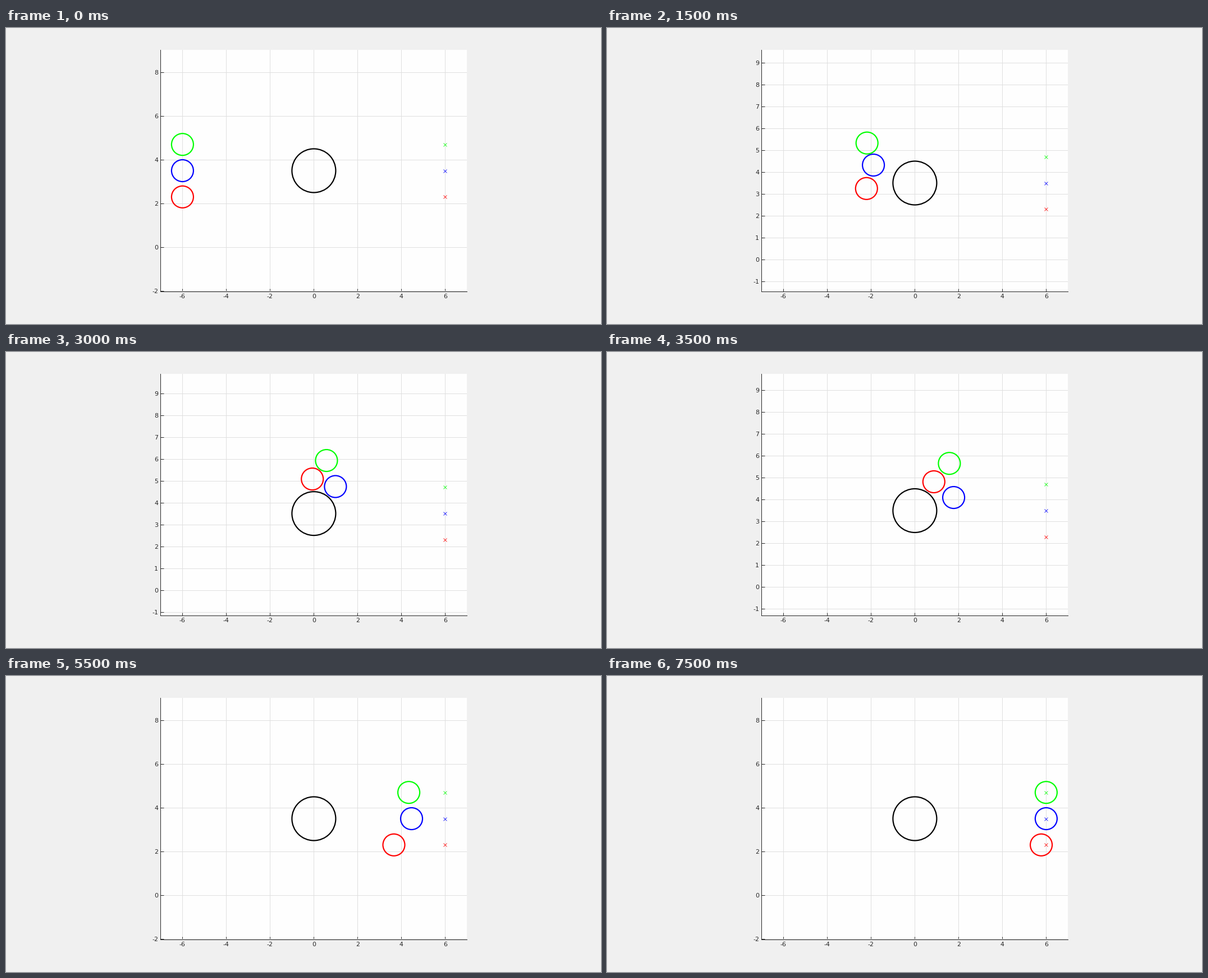
Recreate the animation shown at these times as a matplotlib script. Size 1060 px wide and 528 px high, loop 8 s.

```python
import math

import matplotlib.pyplot as plt
import numpy as np
from matplotlib.animation import FuncAnimation
from matplotlib.patches import Circle

W, H, DPI = 1060, 528, 100
LEFT, BOTTOM, WIDTH, HEIGHT = 275.4, 58.0, 546, 431
UNIT = WIDTH / 14                 # pixels per data unit, same on both axes
HALF = HEIGHT / UNIT / 2          # half of the visible y range
STEPS, STEP_MS = 16, 500
INK = "#262626"
RADIUS = 0.5
START, GOAL = -6, 6
POST = np.array([0, 3.5])         # centre of the black obstacle
CLEARANCE = 1.58                  # closest a disc centre gets to it

# Each disc leaves and reaches its lane; between, it swerves via key points.
KEY_STEPS = [0, 2, 4, 5, 7, 8, 9, 15]
DISCS = [  # colour, lane height, x at later keys, y at the swerve keys
    ("#ff0000", 2.3, [-3.1, -1.51, -0.96, 0.87, 1.48, 2.295, 5.774],
     [2.7, 4.0, 4.77, 4.82, 3.4]),
    ("#0000ff", 3.5, [-3.1, -0.81, 0.14, 1.774, 2.55, 3.264, 6.35],
     [3.8, 4.875, 5.1, 4.1, 3.6]),
    ("#00ff00", 4.7, [-3.1, -1.365, -0.45, 1.577, 2.4, 3.11, 6.35],
     [4.9, 5.816, 6.03, 5.66, 4.905]),
]


def end_slope(h0, h1, d0, d1):
    slope = ((2 * h0 + h1) * d0 - h0 * d1) / (h0 + h1)
    return slope if slope * d0 > 0 else 0


def inner_slope(h0, h1, d0, d1):
    if d0 * d1 <= 0:
        return 0
    w0, w1 = 2 * h1 + h0, h1 + 2 * h0
    return (w0 + w1) / (w0 / d0 + w1 / d1)


def smooth(t, keys, vals):
    """Monotone cubic through the key values."""
    h, d = np.diff(keys), np.diff(vals) / np.diff(keys)
    m = [inner_slope(*h[i:i + 2], *d[i:i + 2]) for i in range(len(h) - 1)]
    m = [end_slope(*h[:2], *d[:2]), *m, end_slope(*h[:-3:-1], *d[:-3:-1])]
    i = min(np.searchsorted(keys, t, side="right") - 1, len(h) - 1)
    u = (t - keys[i]) / h[i]
    rise = vals[i] + (vals[i + 1] - vals[i]) * u * u * (3 - 2 * u)
    return rise + h[i] * u * (1 - u) * (m[i] * (1 - u) - m[i + 1] * u)


def place(disc, step):
    _, lane, xs, ys = disc
    x = smooth(step, KEY_STEPS, [START, *xs])
    y = smooth(step, KEY_STEPS, [lane, *ys, lane, lane])
    spot = np.array([min(x, GOAL), y])
    away = spot - POST
    gap = np.hypot(*away)
    return POST + away * max(1, CLEARANCE / gap)


def pt(px):
    return px * 72 / DPI


def ring(x, y, r, color):
    return ax.add_patch(Circle((x, y), r, fill=False, ec=color, lw=pt(2.2), zorder=3))


plt.rcParams.update({"font.family": "DejaVu Sans", "axes.unicode_minus": False})
fig = plt.figure(figsize=(W / DPI, H / DPI), dpi=DPI, facecolor="#f0f0f0")
ax = fig.add_axes([LEFT / W, BOTTOM / H, WIDTH / W, HEIGHT / H], facecolor="#fefefe")
ax.set_axisbelow(True)
ax.grid(True, color="#dfdfdf", lw=pt(1))
ax.tick_params(direction="in", length=pt(5.5), width=pt(1), color=INK,
               labelcolor=INK, labelsize=pt(11), pad=pt(4.4))
for side, spine in ax.spines.items():
    spine.set_visible(side in ("left", "bottom"))
    spine.set(color=INK, linewidth=pt(1))
ax.set_xticks(range(-6, 7, 2))
ax.set_xlim(-7, 7)

ring(*POST, 1, "#000000")
rings = []
for color, lane, *_ in DISCS:
    ax.plot(GOAL, lane, "x", color=color, ms=pt(5.6), mew=pt(0.8))
    rings.append(ring(START, lane, RADIUS, color))


def frame_view(heights):
    """Centre the y axis on everything drawn and pick the tick spacing."""
    low = min(2.3, min(heights) - RADIUS)
    high = max(4.7, max(heights) + RADIUS)
    mid = (low + high) / 2
    first, last = math.ceil(mid - HALF), math.floor(mid + HALF)
    gap = 2 if last - first + 1 > 11 else 1
    ax.set_yticks(np.arange(first, last + 1, gap))
    ax.set_ylim(mid - HALF, mid + HALF)


def draw(step):
    spots = [place(disc, step) for disc in DISCS]
    for patch, spot in zip(rings, spots):
        patch.center = spot
    frame_view([y for _, y in spots])
    return rings


anim = FuncAnimation(fig, draw, frames=STEPS, init_func=lambda: draw(0),
                     interval=STEP_MS, repeat=True, repeat_delay=0, blit=False)
plt.show()
```
